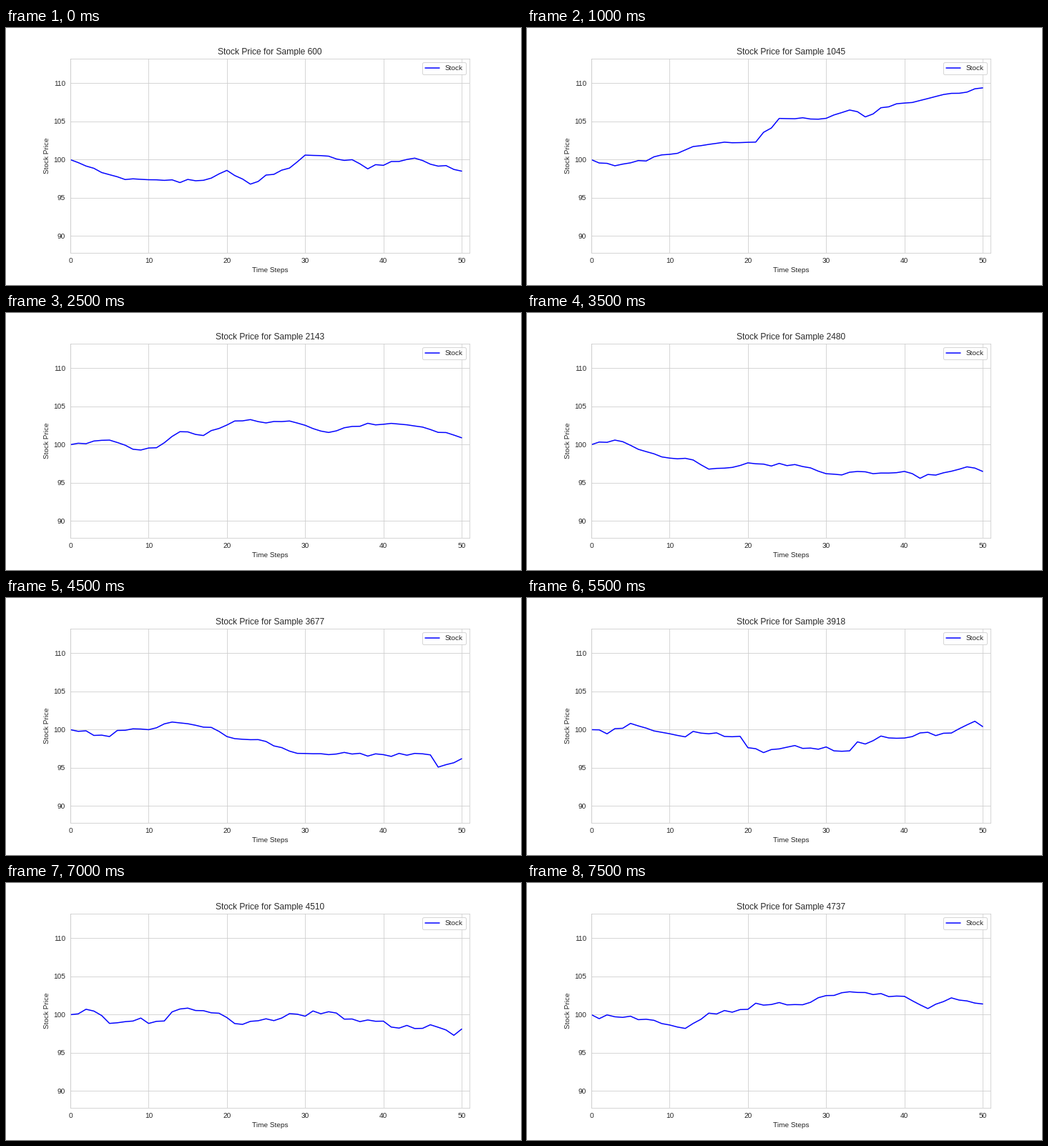
Animation of 720 by 360 pixels, one loop 8000 ms. Source, as a matplotlib script:

```python
import numpy as np
import matplotlib.pyplot as plt
from matplotlib.animation import FuncAnimation

STEPS = 50
START = 100
INK, GRID = ".15", ".8"

plt.rcParams.update({
    "font.family": "Liberation Sans", "font.size": 10,
    "text.hinting": "native",
    "text.color": INK, "axes.labelcolor": INK,
    "xtick.color": INK, "ytick.color": INK,
    "xtick.bottom": False, "ytick.left": False,
    "axes.edgecolor": GRID, "axes.grid": True, "axes.axisbelow": True,
    "grid.color": GRID, "lines.solid_capstyle": "round",
})

t = np.arange(STEPS + 1)


def trend(number, *turns):
    """Straight runs between (step, price) turns, roughened in between."""
    x, y = zip((0, START), *turns)
    jitter = np.random.default_rng(number).normal(0, 0.12, t.size)
    jitter[list(x)] = 0
    return number, np.interp(t, x, y) + jitter


def walk(number, low):
    """Random walk whose drift makes it just touch `low`."""
    noise = np.random.default_rng(number).normal(0, 0.45, STEPS).cumsum()
    drift = np.max((low - START - noise) / t[1:])
    return number, START + np.r_[0, noise + drift * t[1:]]


samples = [
    trend(600, (7, 97.4), (17, 97.3), (20, 98.6), (23, 96.8), (28, 98.9),
          (30, 100.6), (36, 100), (38, 98.8), (44, 100.2), (50, 98.5)),
    walk(803, 98.8),
    trend(1045, (3, 99.2), (10, 100.7), (15, 102), (21, 102.3), (24, 105.4),
          (29, 105.3), (33, 106.5), (35, 105.6), (37, 106.8), (50, 109.4)),
    walk(1398, 97.9),
    walk(1790, 99.35),
    trend(2143, (5, 100.6), (8, 99.4), (11, 99.6), (14, 101.7), (17, 101.2),
          (21, 103.1), (28, 103.1), (33, 101.6), (38, 102.8), (43, 102.6),
          (50, 100.9)),
    walk(2316, 97.6),
    trend(2480, (3, 100.6), (9, 98.4), (13, 98), (15, 96.8), (21, 97.5),
          (26, 97.4), (30, 96.2), (40, 96.5), (42, 95.6), (48, 97.1),
          (50, 96.5)),
    walk(3102, 96.8),
    trend(3677, (5, 99.1), (6, 99.9), (10, 100), (13, 101), (18, 100.3),
          (20, 99.1), (24, 98.7), (29, 96.9), (46, 96.7), (47, 95.1),
          (50, 96.2)),
    walk(3791, 94.6),
    walk(3918, 97),
    trend(4052, (7, 101), (11, 99.7), (15, 100.7), (19, 99.9), (23, 98.5),
          (26, 99.4), (33, 99.1), (42, 96.5), (48, 96.2), (50, 95)),
    walk(4297, 97),
    walk(4510, 97.3),
    trend(4737, (7, 99.4), (12, 98.2), (15, 100.2), (20, 100.7), (21, 101.5),
          (27, 101.3), (30, 102.5), (33, 103), (40, 102.4), (43, 100.8),
          (46, 102.2), (50, 101.4)),
]

fig, ax = plt.subplots(figsize=(10, 5), dpi=72)
fig.subplots_adjust(left=0.125, right=0.9, bottom=0.125, top=0.88)
line, = ax.plot([], [], color="blue", lw=1.5, label="Stock")
ax.set(xlim=(0, STEPS + 1), ylim=(87.8, 113.2),
       xlabel="Time Steps", ylabel="Stock Price")
title = ax.set_title("")
ax.legend(loc="upper right")


def draw(i):
    number, prices = samples[i]
    line.set_data(t, prices)
    title.set_text(f"Stock Price for Sample {number}")
    return line, title


anim = FuncAnimation(fig, draw, frames=len(samples), interval=500,
                     repeat=True, repeat_delay=0)
plt.show()
```
